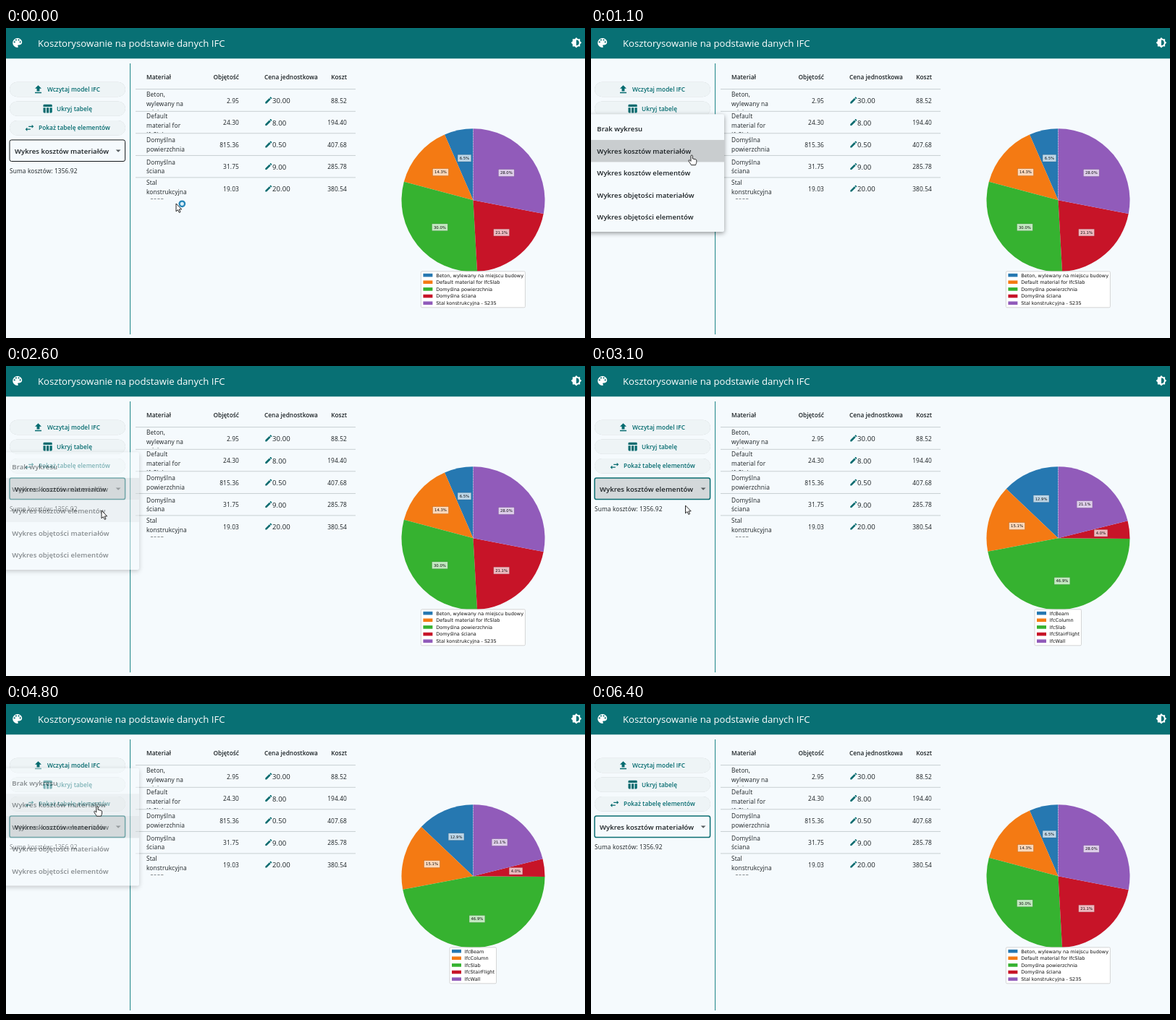
These frames come from a looping animation (800 by 429 pixels, 6500 ms). An HTML page:

```html
<!DOCTYPE html>
<html lang="pl">
<head>
<meta charset="utf-8">
<title>Kosztorysowanie</title>
<style>
  html, body { margin: 0; width: 100%; height: 100%; overflow: hidden; background: #f5fafd; }
  svg { display: block; width: 100%; height: 100%; }
  text { font-family: "Open Sans", "Noto Sans", sans-serif; fill: #1b2124; white-space: pre; }
  .title { font-size: 13.15px; fill: #fff; }
  .body { font-size: 8.37px; letter-spacing: .12px; }
  .price { font-size: 9.56px; letter-spacing: .1px; }
  .head { font-size: 8.3px; font-weight: 600; letter-spacing: .04px; }
  .choice { font-size: 9.56px; font-weight: 600; letter-spacing: .06px; }
  .teal { fill: #046b6f; }
  .legend { font: 6.54px "DejaVu Sans", sans-serif; fill: #111; }
  .percent { font: 5.3px "DejaVu Sans", sans-serif; fill: #111; }
  .pill { fill: #eef4f6; filter: drop-shadow(0 .7px .7px rgba(0, 0, 0, .22)); }
  .panel { fill: #f5fafd; filter: drop-shadow(0 2px 3px rgba(0, 0, 0, .4)); }
</style>
</head>
<body>
<svg viewBox="0 0 800 429">
  <g id="page"></g>
  <g id="live"></g>
</svg>
<script>
const LOOP = 6500, STEP = 100;
const ROW = 30.55;
const SLICE_COLORS = ['#2678b1', '#f47a13', '#36b230', '#c71428', '#915bba'];
const OPTIONS = ['Brak wykresu', 'Wykres kosztów materiałów', 'Wykres kosztów elementów',
  'Wykres objętości materiałów', 'Wykres objętości elementów'];

const ICONS = {
  palette: 'M12 3a9 9 0 0 0 0 18c.83 0 1.5-.67 1.5-1.5 0-.39-.15-.74-.39-1.01-.23-.26-.38-.61-.38-.99 0-.83.67-1.5 1.5-1.5H16c2.76 0 5-2.24 5-5 0-4.42-4.03-8-9-8z' +
    [[6.5, 10.5], [9.5, 6.5], [14.5, 6.5], [17.5, 10.5]]
      .map(([x, y]) => `M${x - 1.5} ${y}a1.5 1.5 0 0 0 3 0a1.5 1.5 0 0 0-3 0z`).join(''),
  brightness: 'M20 15.31L23.31 12 20 8.69V4h-4.69L12 .69 8.69 4H4v4.69L.69 12 4 15.31V20h4.69L12 23.31 15.31 20H20zM12 18V6a6 6 0 0 1 0 12z',
  upload: 'M5 20h14v-2H5zM5 10h4v6h6v-6h4l-7-7z',
  table: 'M10 10h5v11h-5zM17 21h3a2 2 0 0 0 2-2v-9h-5zM20 3H5a2 2 0 0 0-2 2v3h19V5a2 2 0 0 0-2-2zM3 19a2 2 0 0 0 2 2h3V10H3z',
  swap: 'M7 11l-4 4 4 4v-3h7v-2H7zM21 9l-4-4v3h-7v2h7v3z',
  pencil: 'M3 17.25V21h3.75L17.81 9.94l-3.75-3.75zM20.71 7.04a1 1 0 0 0 0-1.41l-2.34-2.34a1 1 0 0 0-1.41 0l-1.83 1.83 3.75 3.75z'
};

const text = (x, y, style, content, extra = '') =>
  `<text x="${x}" y="${y}" class="${style}" ${extra}>${content}</text>`;
const rect = (x, y, w, h, attrs) =>
  `<rect x="${x}" y="${y}" width="${w}" height="${h}" ${attrs}/>`;
const icon = (name, cx, cy, size, color) =>
  `<path d="${ICONS[name]}" fill="${color}" fill-rule="evenodd"
    transform="translate(${cx - size / 2} ${cy - size / 2}) scale(${size / 24})"/>`;
const END = 'text-anchor="end"', MIDDLE = 'text-anchor="middle"';

function button(y, name, iconX, textX, label) {
  return rect(5, y - 10.2, 160, 20.4, 'rx="10.2" class="pill"') +
    icon(name, iconX, y, 15.4, '#046b6f') + text(textX, y + 3.2, 'head teal', label);
}

function tableRow([lines, volume, price, cost], i) {
  const top = 84.7 + i * ROW;
  const first = top + (lines.length > 2 ? 10.2 : 12.4);
  return `<clipPath id="row${i}">${rect(190, top, 90, ROW - .8, '')}</clipPath>` +
    rect(179, top - .4, 304, .8, 'fill="#bdc5c8"') +
    `<g clip-path="url(#row${i})">` +
    lines.map((line, n) => text(194, first + n * 12.7, 'body', line)).join('') + '</g>' +
    text(322, top + 18.8, 'body', volume, END) +
    icon('pencil', 362.8, top + 15.2, 12, '#046b6f') +
    text(368, top + 19.3, 'price', price) +
    text(471, top + 18.8, 'body', cost, END);
}

// Slices run counter-clockwise from twelve o'clock.
function chart(shares, names, legendX, legendWidth) {
  const cx = 645.5, cy = 238.3, radius = 99;
  const total = shares.reduce((a, b) => a + b);
  const point = (turn, r) => {
    const a = Math.PI / 2 + turn * 2 * Math.PI;
    return [cx + r * Math.cos(a), cy - r * Math.sin(a)];
  };
  let turn = 0, slices = '', labels = '';
  shares.forEach((share, i) => {
    const part = share / total;
    const label = (part * 100).toFixed(1) + '%';
    const [x, y] = point(turn + part / 2, radius * .6);
    slices += `<path fill="${SLICE_COLORS[i]}" d="M${cx} ${cy}L${point(turn, radius)}
      A${radius} ${radius} 0 0 0 ${point(turn + part, radius)}Z"/>`;
    const w = label.length > 4 ? 21.6 : 18.6;
    labels += rect(x - w / 2, y - 4.8, w, 9.6,
      'fill="#fff" fill-opacity=".7" stroke="#555" stroke-opacity=".35" stroke-width=".5"') +
      text(x, y + 1.9, 'percent', label, MIDDLE);
    turn += part;
  });
  const seam = `<path d="M${cx} ${cy}V${cy - radius}" stroke="#fff" stroke-opacity=".45"
    stroke-width=".7" stroke-dasharray="2 1.5"/>`;
  const legend = rect(legendX, 336.8, legendWidth, 50, 'rx="1.5" fill="#fff" stroke="#ccc" stroke-width=".8"') +
    names.map((name, i) => {
      const y = 342.2 + i * 9.65;
      return rect(legendX + 3, y - 2.4, 13, 4.6, `fill="${SLICE_COLORS[i]}"`) +
        text(legendX + 20.8, y + 2.3, 'legend', name);
    }).join('');
  return slices + seam + labels + legend;
}

const materialChart = chart([88.52, 194.4, 407.68, 285.78, 380.54],
  ['Beton, wylewany na miejscu budowy', 'Default material for IfcSlab',
    'Domyślna powierzchnia', 'Domyślna ściana', 'Stal konstrukcyjna - S235'], 573.4, 144);
const elementChart = chart([12.9, 15.1, 46.9, 4, 21.1],
  ['IfcBeam', 'IfcColumn', 'IfcSlab', 'IfcStairFlight', 'IfcWall'], 613, 64.5);

const page = rect(0, 0, 800, 429, 'fill="#f5fafd"') +
  rect(0, 0, 800, 42.3, 'fill="#087074"') +
  icon('palette', 15.7, 20.5, 17.3, '#fff') +
  icon('brightness', 788, 20.3, 15.4, '#fff') +
  text(44, 26, 'title', 'Kosztorysowanie na podstawie danych IFC') +
  rect(171, 49, 1.1, 375, 'fill="#2b8d8f"') +
  button(85, 'upload', 44.5, 57, 'Wczytaj model IFC') +
  button(111.6, 'table', 57.3, 70, 'Ukryj tabelę') +
  button(138.2, 'swap', 32.5, 45, 'Pokaż tabelę elementów') +
  text(5, 201.3, 'body', 'Suma kosztów: 1356.92') +
  text(194, 70.5, 'head', 'Materiał') +
  text(322, 70.5, 'head', 'Objętość', END) +
  text(357, 70.5, 'head', 'Cena jednostkowa') +
  text(471, 70.5, 'head', 'Koszt', END) +
  [
    [['Beton,', 'wylewany na', 'miejscu'], '2.95', '30.00', '88.52'],
    [['Default', 'material for', 'IfcSlab'], '24.30', '8.00', '194.40'],
    [['Domyślna', 'powierzchnia'], '815.36', '0.50', '407.68'],
    [['Domyślna', 'ściana'], '31.75', '9.00', '285.78'],
    [['Stal', 'konstrukcyjna', '- S235'], '19.03', '20.00', '380.54']
  ].map(tableRow).join('');

const MENUS = [
  { open: 1000, close: 2500, selected: 1 },
  { open: 3600, close: 4700, selected: 2 }
];
const FADE = 200;

// [time, x, y] of the pointer's hot spot
const POINTER = [[0, 235, 243], [100, 233, 241], [600, 141, 178], [700, 139.5, 176], [1800, 138.5, 177.5],
  [2300, 133, 199], [2600, 132, 200], [3100, 130.5, 193], [3400, 129, 178], [4000, 128.5, 176.5],
  [4200, 128.5, 176.5], [4600, 126, 142], [4900, 126, 142], [5600, 205.5, 27]];

const clamp = v => Math.max(0, Math.min(1, v));
const smooth = v => v * v * (3 - 2 * v);

function pointerAt(t) {
  const i = POINTER.findIndex(key => key[0] >= t);
  if (i <= 0) return POINTER[i < 0 ? POINTER.length - 1 : 0].slice(1);
  const [a, b] = [POINTER[i - 1], POINTER[i]];
  const k = smooth((t - a[0]) / (b[0] - a[0]));
  return [a[1] + (b[1] - a[1]) * k, a[2] + (b[2] - a[2]) * k];
}

function dropdown(t, hovered) {
  const focused = t >= 1000;
  const fill = focused && t < 6400 ? '#d3d8da' : !focused && hovered ? '#e7ecee' : '#f5fafd';
  const border = focused ? 'stroke="#0b6e72" stroke-width="1.5"' : 'stroke="#15191b" stroke-width="1"';
  const label = OPTIONS[t >= 2500 && t < 4700 ? 2 : 1];
  return rect(5, 154.9, 159.6, 29.6, `rx="2.6" fill="${fill}" ${border}`) +
    text(12, 173.6, 'choice', label) +
    '<path d="M151.7 168.4h6.8l-3.4 3.4z" fill="#555b5e"/>';
}

function menu(t, { open, close, selected }, pointerY) {
  const shown = clamp((t - open + STEP) / 300);
  const alpha = Math.min(clamp(shown * 3), 1 - clamp((t - close) / FADE));
  const grow = smooth(clamp(shown * 1.5));
  const fullTop = 154.9 - selected * ROW - 5;
  const top = 149.9 + (fullTop - 149.9) * grow;
  const height = 40 + (5 * ROW + 10 - 40) * grow;
  const hovered = Math.floor((pointerY - fullTop - 5) / ROW);
  const items = OPTIONS.map((label, i) => {
    const y = fullTop + 5 + i * ROW;
    const shade = i === selected ? (i === hovered ? '#c9cdcf' : '#d5dadc') : i === hovered ? '#e5eaec' : '';
    return (shade ? rect(0, y, 184, ROW, `fill="${shade}"`) : '') + text(8.3, y + 18.8, 'choice', label);
  }).join('');
  return `<clipPath id="panelClip">${rect(-4, top, 188, height, 'rx="2.5"')}</clipPath>
    <g opacity="${alpha}">${rect(-4, top, 188, height, 'rx="2.5" class="panel"')}
    <g clip-path="url(#panelClip)" opacity="${clamp(shown * 3 - 1)}">${items}</g></g>`;
}

function pointer(x, y, hand, busy) {
  const arrowPath = 'M0 0V10.8L2.5 8.6 4.3 12.4 6 11.7 4.3 7.9H7.7Z';
  const handPath = 'M-1.2 7V.8a1.2 1.2 0 0 1 2.4 0V4.4l4 .9a1.8 1.8 0 0 1 1.4 1.8V9c0 2-1 2.5-1.2 4.2H-.8' +
    'C-1.4 11.4-3.4 9.5-4.2 7.6-4.6 6.4-3.4 5.8-2.6 6.6L-1.2 8Z';
  const ring = busy && !hand
    ? '<circle cx="8.3" cy=".3" r="3.7" fill="#d8eef8" stroke="#2585b8" stroke-width="2.3"/>' : '';
  return `<g transform="translate(${x} ${y})">${ring}<path d="${hand ? handPath : arrowPath}"
    fill="#fff" stroke="#111" stroke-width=".9" stroke-linejoin="round"/></g>`;
}

function live(t) {
  const [x, y] = pointerAt(t);
  const activeMenu = MENUS.find(m => t >= m.open && t < m.close + FADE);
  const overDropdown = x > 5 && x < 165 && y > 155 && y < 185;
  const overButton = x > 5 && x < 165 && y > 75 && y < 148;
  const menuLive = activeMenu && t < activeMenu.close;
  return (t >= 2700 && t < 5100 ? elementChart : materialChart) +
    dropdown(t, overDropdown) +
    (activeMenu ? menu(t, activeMenu, y) : '') +
    (t < 5700 ? pointer(x, y, menuLive || overDropdown || overButton, t < 600 || t >= 5000) : '');
}

document.getElementById('page').innerHTML = page;
const liveLayer = document.getElementById('live');
let lastStep = -1;

function draw() {
  const step = Math.floor(performance.now() % LOOP / STEP);
  if (step !== lastStep) {
    lastStep = step;
    liveLayer.innerHTML = live(step * STEP);
  }
  requestAnimationFrame(draw);
}
draw();
</script>
</body>
</html>
```
